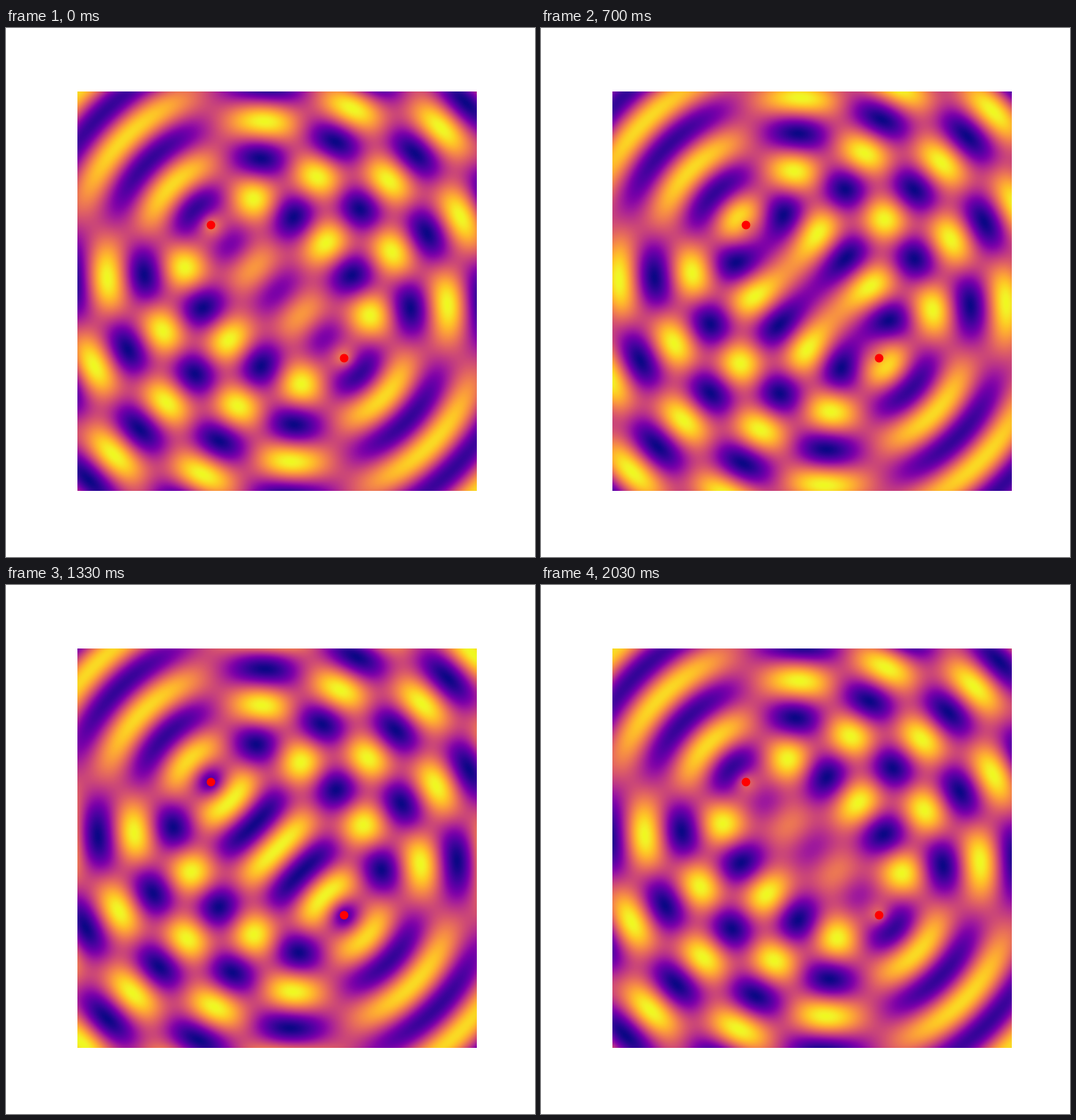
These frames come from a looping animation (600x600 px, 2100 ms). A matplotlib script:

```python
import numpy as np
import matplotlib.pyplot as plt
from matplotlib.animation import FuncAnimation

SIZE = 600
WAVELENGTH = 100
SOURCES = [(200, 200), (400, 400)]
FRAMES = 30

k = 2 * np.pi / WAVELENGTH
y, x = np.mgrid[0:SIZE, 0:SIZE]
distances = [np.hypot(x - sx, y - sy) for sx, sy in SOURCES]


def field(frame):
    """Sum of the circular waves leaving both sources."""
    phase = 2 * np.pi * frame / FRAMES
    return sum(np.sin(phase - k * r) for r in distances)


fig = plt.figure(figsize=(6, 6), dpi=100, facecolor="white")
ax = fig.add_axes([81 / 600, 75 / 600, 453 / 600, 453 / 600])
ax.axis("off")

image = ax.imshow(field(0), cmap="plasma", vmin=-2, vmax=2)
ax.scatter(*zip(*SOURCES), color="red", s=36, zorder=3)
ax.set(xlim=(-0.5, SIZE - 0.5), ylim=(SIZE - 0.5, -0.5))


def update(frame):
    image.set_data(field(frame))
    return [image]


anim = FuncAnimation(fig, update, frames=FRAMES, interval=70,
                     repeat=True, repeat_delay=0, blit=False)
plt.show()
```
